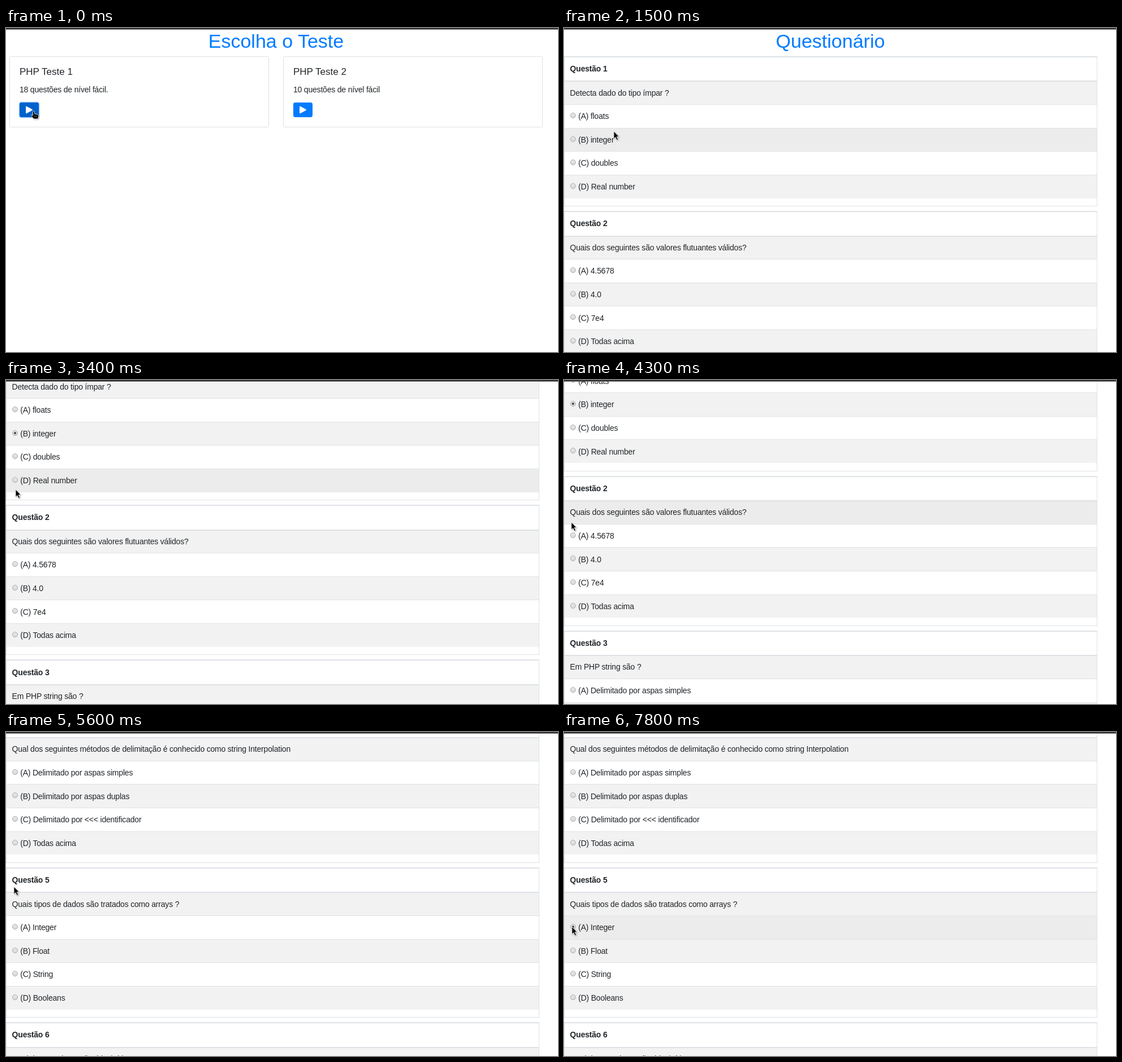
These frames come from a looping animation (976x574 px, 8000 ms). An HTML page:

```html
<!DOCTYPE html>
<html lang="pt">
<head>
<meta charset="utf-8">
<title>Questionário</title>
<style>
* { box-sizing: border-box; }
html, body { margin: 0; width: 100%; height: 100%; overflow: hidden; background: #fff; }
body { position: relative; font: 14px/20.4px "Liberation Sans", Arial, sans-serif; letter-spacing: -.2px; color: #212529; }
#bar { position: absolute; left: 0; top: 0; width: 976px; height: 3px; background: #333; border-bottom: 1px solid #777; background-clip: padding-box; }
#home, #quiz { position: absolute; left: 0; top: 0; }
h1 { position: absolute; left: 0; top: 2.6px; margin: 0; font: 34px/40.8px "Liberation Sans", Arial, sans-serif; letter-spacing: 0; color: #007bff; text-align: center; }
#home h1 { width: 955px; }
#quiz h1 { width: 942px; }
.card { position: absolute; top: 50px; width: 459px; height: 126px; border: 1px solid #dfdfdf; border-radius: 3.4px; }
.card > * { position: absolute; left: 17px; white-space: nowrap; }
.card b { top: 17px; font: 17px/20.4px "Liberation Sans", Arial, sans-serif; letter-spacing: 0; }
.card span { top: 47.75px; }
.card svg { top: 81px; width: 34px; height: 26px; border-radius: 3.4px; background: #007bff; }
.q { position: absolute; left: 0; width: 943px; height: 266.2px; border: 1px solid #dee2e6; white-space: nowrap; }
.head { height: 42.35px; padding: 10.2px 9.6px 0; border-top: 1px solid #dee2e6; font-weight: bold; }
.row { position: relative; height: 41.65px; padding: 10.2px 0 0 24.2px; border-top: 1px solid #dee2e6; }
.row.ask { padding: 9.2px 0 0 9.6px; border-top-width: 2px; }
.row:nth-child(even) { background: #f2f2f2; }
.row.hover { background: #ececec; }
.row i { position: absolute; left: 10px; top: 14px; width: 10px; height: 10px; border: 1px solid #aaa; border-radius: 50%; background: linear-gradient(#e8e8e8, #d8d8d8); }
.row i.on::after { content: ""; position: absolute; left: 2px; top: 2px; width: 4px; height: 4px; border-radius: 50%; background: #444; }
.cursor { position: absolute; left: 0; top: 0; overflow: visible; width: 1px; height: 1px; filter: drop-shadow(1px 1px 1px #0005); }
.cursor path { fill: #000; stroke: #fff; stroke-width: .8; }
#hand { left: 49px; }
</style>
</head>
<body>
<div id="home"><h1>Escolha o Teste</h1></div>
<div id="quiz"><h1>Questionário</h1></div>
<div id="bar"></div>
<svg class="cursor" id="hand"><path d="M-1.5 1Q0-1 1.5 1V5L7 6.2Q9 7 8.8 9L7.5 14H0L-4.5 8.5Q-5 6.5-3 7L-1.5 8.2Z"/><path d="M2 8V10M4.5 8.3V10.3" style="stroke-width:.6"/></svg>
<svg class="cursor" id="arrow"><path d="M0 0V13.2L3 10.5 5.3 15.6 7.6 14.5 5.3 9.6H9.2Z"/></svg>
<script>
const $ = id => document.getElementById(id);
const home = $('home'), quiz = $('quiz'), hand = $('hand'), arrow = $('arrow');

// Layout of the question list
const TOP = 50, PITCH = 274.2, HEAD = 43.35, ROW = 41.65;

const quoting = ['Delimitado por aspas simples', 'Delimitado por aspas duplas', 'Delimitado por &lt;&lt;&lt; identificador', 'Todas acima'];
const types = ['Integer', 'Float', 'String', 'Booleans'];
const questions = [
  ['Detecta dado do tipo ímpar ?', 'floats', 'integer', 'doubles', 'Real number'],
  ['Quais dos seguintes são valores flutuantes válidos?', '4.5678', '4.0', '7e4', 'Todas acima'],
  ['Em PHP string são ?', ...quoting],
  ['Qual dos seguintes métodos de delimitação é conhecido como string Interpolation', ...quoting],
  ['Quais tipos de dados são tratados como arrays ?', ...types],
  ['Qual dos seguintes não é incluído em outros arrays ?', ...types]
];

['18 questões de nível fácil.', '10 questões de nível fácil'].forEach((text, i) => {
  home.innerHTML += `<div class="card" style="left:${6 + 484 * i}px"><b>PHP Teste ${i + 1}</b><span>${text}</span>
    <svg><path d="M12 7.6V18.4L21.8 13Z" fill="#fff" stroke="#fff" stroke-width="2" stroke-linejoin="round"/></svg></div>`;
});
questions.forEach(([ask, ...answers], k) => {
  quiz.innerHTML += `<div class="q" style="top:${TOP + PITCH * k}px"><div class="head">Questão ${k + 1}</div><div class="row ask">${ask}</div>` +
    answers.map((a, i) => `<div class="row"><i></i>(${'ABCD'[i]}) ${a}</div>`).join('') + '</div>';
});
const button = home.querySelector('.card svg');
const rows = [...quiz.querySelectorAll('.row')];

// Pointer moves: start, end, x, y
const moves = [
  [1000, 1100, 112, 179], [1100, 1200, 108, 226], [1300, 1500, 88, 183], [1500, 1900, 18, 210], [2000, 2400, 17, 194],
  [4200, 4300, 13, 252], [4400, 4600, 14, 274], [5900, 6500, 19, 343], [6900, 7400, 14, 345]
];
const clicks = [3000, 5000, 7800];

const scrollAt = t => t < 3400 ? 0 : t < 3700 ? 103 : t < 5600 ? 154.5 : 906.8;

function pointAt(t) {
  let x = 50, y = 148;
  for (const [start, end, toX, toY] of moves) {
    const f = Math.min(1, Math.max(0, (t - start) / (end - start)));
    x += (toX - x) * f;
    y += (toY - y) * f;
  }
  return [Math.round(x), Math.round(y)];
}

// The hover trails the drawn pointer by a few pixels
function rowAt(t) {
  const y = pointAt(t)[1] - 3 + scrollAt(t) - TOP - HEAD;
  const k = Math.floor(y / PITCH), r = Math.floor((y - k * PITCH) / ROW);
  return r < 5 ? rows[k * 5 + r] : null;
}
const checks = clicks.map(t => [t, rowAt(t).querySelector('i')]);

function draw(now) {
  const t = Math.floor(now % 8000 / 100) * 100;
  const start = t < 700;
  home.style.display = hand.style.display = start ? '' : 'none';
  quiz.style.display = arrow.style.display = start ? 'none' : '';

  button.style.background = t < 500 ? '#0062cc' : '#0069d9';
  button.style.boxShadow = t < 100 ? '0 0 0 1.5px rgba(0,123,255,.35)' : '0 0 0 2.7px rgba(0,123,255,.5)';
  hand.style.top = (t < 100 ? 147 : 149) + 'px';

  const [x, y] = pointAt(t);
  arrow.style.left = x + 'px';
  arrow.style.top = y + 'px';
  quiz.style.top = -scrollAt(t) + 'px';
  const hover = rowAt(t);
  rows.forEach(row => row.classList.toggle('hover', row === hover));
  checks.forEach(([at, radio]) => radio.classList.toggle('on', t >= at));
}

const began = performance.now();
function loop() {
  draw(performance.now() - began);
  requestAnimationFrame(loop);
}
loop();
</script>
</body>
</html>
```
